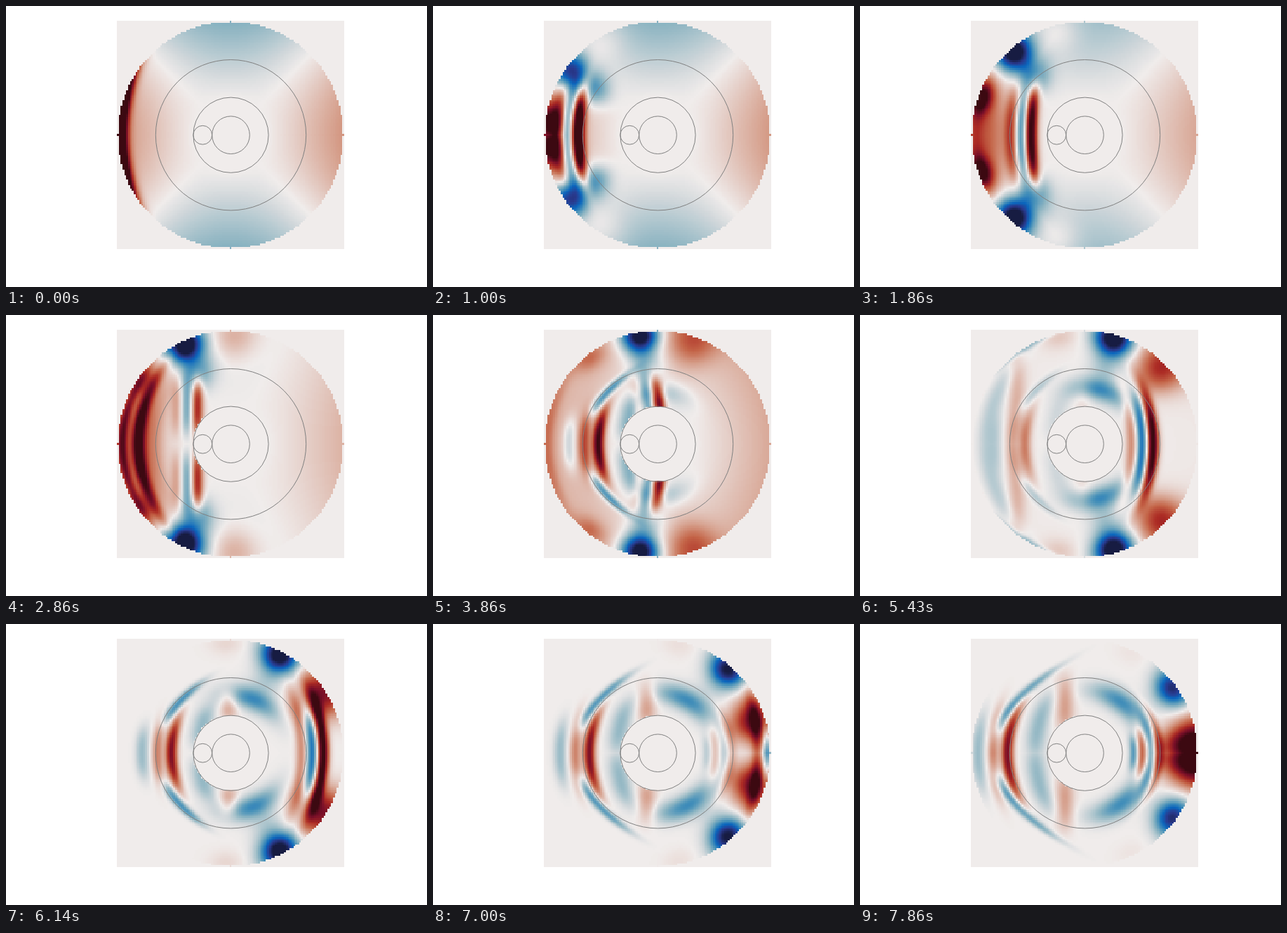
Write an HTML page with a canvas that moves like this. It is 600 by 400 pixels and loops after 8 s.

```html
<!DOCTYPE html>
<html lang="en">
<head>
<meta charset="utf-8">
<title>Waves in a disc with a core</title>
<style>
  html, body { margin: 0; width: 100%; height: 100%; overflow: hidden; background: #fff; }
  canvas { display: block; }
</style>
</head>
<body>
<canvas id="stage" width="600" height="400"></canvas>
<script>
const RADIUS = 60, CORE = 20, SIZE = 2 * RADIUS + 1, CELL = 2.68;
const LOOP = 8000;

const ctx = document.getElementById('stage').getContext('2d');
const grid = document.createElement('canvas');
grid.width = grid.height = SIZE;
const gridCtx = grid.getContext('2d');
const image = gridCtx.createImageData(SIZE, SIZE);

const clamp = (x, lo = 0, hi = 1) => Math.min(hi, Math.max(lo, x));
const bump = (x, center, width) => Math.exp(-(((x - center) / width) ** 2));
const smooth = (from, to, x) => {
  const q = clamp((x - from) / (to - from));
  return q * q * (3 - 2 * q);
};

// Diverging colour scale over -1..1
const blues = ['171c42', '293a8f', '0b66bd', '4590b9', '8eb5c2', 'd2d8db'];
const reds = ['e6d2cc', 'd59d89', 'c46548', 'ac2b24', '780e28', '3c0911'];
const rgb = hex => [0, 2, 4].map(i => parseInt(hex.slice(i, i + 2), 16));
const stops = [...blues, 'f0eceb', ...reds].map(rgb);
const level = i => i === 6 ? 0 : (i < 6 ? i : i - 1) * 2 / 11 - 1;
const palette = Array.from({ length: 401 }, (_, n) => {
  const value = n / 200 - 1;
  let i = 0;
  while (i < 11 && level(i + 1) < value) i++;
  const q = (value - level(i)) / (level(i + 1) - level(i));
  return stops[i].map((c, j) => c + (stops[i + 1][j] - c) * q);
});

// A Gaussian crest across x, bent into a parabola along y
const ridge = (x0, y0, width, height, bend, amplitude) => p => {
  const across = (p.x - x0 - bend * (p.y * p.y - y0 * y0)) / width;
  const along = Math.abs(p.y - y0) / height;
  return amplitude * Math.exp(-across * across - along ** 3);
};

// A Gaussian patch that follows a circle; degrees count from the left end
const patch = (degrees, radius, depth, length, amplitude) => p => {
  const across = (p.r - radius) / depth;
  const along = radius * (p.angle - degrees * Math.PI / 180) / length;
  return amplitude * Math.exp(-across * across - along * along);
};

// Shape of a rest state that slowly relaxes
function background(s) {
  const quadrupole = .3 * Math.exp(-((s / 21) ** 3));
  const uniform = .2 * bump(s, 27, 7);
  return p => (p.r - CORE) / (RADIUS - CORE) * (quadrupole * Math.cos(2 * p.angle) + uniform);
}

// Wave train that crosses the disc and is delayed and split by the core
function front(s) {
  const split = bump(s, 23, 7), young = Math.exp(-s / 4);
  const x = -RADIUS + 2.54 * s - 10 * split;
  const height = (20 + 20 * young + .2 * s) * (1 - .45 * split);
  const amplitude = 1.1 + .7 * young - .55 * split;
  return [0, 1, 2].map(k => ridge(x - 5.7 * k, 24 * split, 3 + 1.5 * young, height,
    .006 * Math.cos(s / 13), amplitude * (-.55) ** k));
}

// Crests and a trough that creep along the rim and meet at the far end
function rim(s) {
  const angle = 20 + 2.25 * s;
  return [
    patch(angle, 58, 9, 10, -.9 - .4 * Math.sin(Math.PI * s / 55) * 1),
    patch(angle, 42, 9, 9, -.6 * (1 - s / 55)),
    patch(44 + 2.4 * s, 58, 11 + s / 12, 13, .1 + 1.15 * (s / 55) ** 2),
    patch(Math.max(0, angle - 29), 58, 6, 9, .75 * Math.exp(-Math.max(0, s - 13) / 13))
  ].map(wave => p => wave(p) * smooth(0, 9, s));
}

// Swell left behind at the near end
function wake(s) {
  const late = bump(s, 20, 5);
  return [
    ridge(-55, 0, 12, 25, 0, .33 * bump(s, 12, 6)),
    ridge(-57.5, 0, 3, 36, .0083, .7 * late),
    ridge(-49 - 1.6 * (s - 20), 0, 3.6, 37, .0078, late),
    ridge(-42, 0, 6, 36, .0078, .25 * late)
  ];
}

// One pattern thrown back by the core, drifting left and growing taller
function echo(drift, strength) {
  const crest = (x, y, width, height, bend, amplitude) =>
    ridge(x - drift, y, width, height + .7 * drift, bend, amplitude * strength);
  return [
    crest(-31.5, 0, 3.1, 19, .0105, .95),
    crest(-39, 0, 3, 17, .006, .42),
    crest(-47, 0, 3.5, 14, .006, -.28),
    crest(-27, 27, 3.2, 11, .0165, -.53),
    crest(-15, 14, 5.5, 11, .008, -.3),
    crest(-1, 26, 5, 8, 0, .32)
  ];
}

function echoes(s) {
  const next = smooth(35, 42, s);
  return [
    ...echo(3.2 * Math.max(0, s - 27), smooth(20, 27, s) * (1 - next)),
    ...echo(.8 * Math.max(0, s - 43), .85 * next)
  ];
}

// Trough hugging the core, and short ripples behind it
function coreRipples(s) {
  const ripples = [0, 1, 2, 3].map(k => ridge(26 + 4.7 * k, 0, 2.3, 9 + 5 * k, -.012,
    -.42 * (-1) ** k * smooth(45, 55, s)));
  return [patch(60 + 1.2 * s, 29 + (s - 34) / 5, 6, 17, -.47 * smooth(22, 32, s)), ...ripples];
}

function paintCell(x, y, color) {
  image.data.set([...color, 255], 4 * ((y + RADIUS) * SIZE + x + RADIUS));
}

function circle(x, radius) {
  ctx.beginPath();
  ctx.arc(320.5 + x * CELL, 183.7, radius * CELL, 0, 2 * Math.PI);
  ctx.stroke();
}

function draw(s) {
  const waves = [background(s), ...front(s), ...rim(s), ...wake(s), ...echoes(s), ...coreRipples(s)];
  for (let y = 0; y <= RADIUS; y++) {
    for (let x = -RADIUS; x <= RADIUS; x++) {
      const r = Math.hypot(x, y);
      let value = 0;
      if (r >= CORE && r <= RADIUS) {
        const point = { x, y, r, angle: Math.acos(-x / r) };
        for (const wave of waves) value += wave(point);
      }
      const color = palette[Math.round((clamp(value, -1, 1) + 1) * 200)];
      paintCell(x, y, color);
      paintCell(x, -y, color);
    }
  }
  gridCtx.putImageData(image, 0, 0);
  ctx.clearRect(0, 0, 600, 400);
  ctx.imageSmoothingEnabled = false;
  ctx.drawImage(grid, 158, 21, 324, 325);
  ctx.strokeStyle = '#808080';
  circle(0, 40);
  circle(0, 20);
  circle(0, 10);
  circle(-15, 5);
}

let shown = -1;
const start = performance.now();
function tick() {
  const time = (performance.now() - start) % LOOP;
  // Seven steps a second, on a 10 ms clock
  const step = Math.floor((Math.floor(time / 10) * 10 + 5) * 7 / 1000);
  if (step !== shown) draw(shown = step);
  requestAnimationFrame(tick);
}
tick();
</script>
</body>
</html>
```
